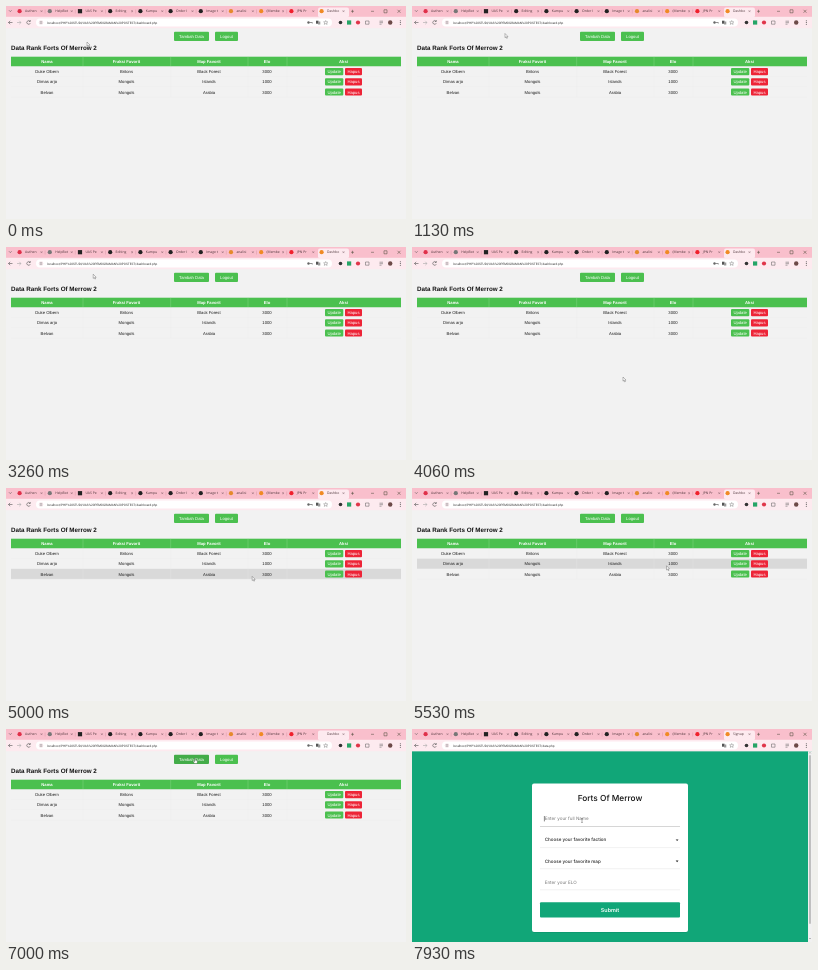
An HTML page for the animation above (8000 ms loop, 400 by 213 pixels).

```html
<!DOCTYPE html>
<html lang="id">
<head>
<meta charset="utf-8">
<title>Dashboard</title>
<style>
  html, body { margin: 0; width: 100%; height: 100%; overflow: hidden; background: #f2f2f2; }
  svg { display: block; width: 100vw; height: 100vh; text-rendering: geometricPrecision; }
  .page { font-family: "Liberation Sans", Arial, sans-serif; }
  .chrome { font-family: "Open Sans", sans-serif; }
  .form { font-family: Inter, sans-serif; }
</style>
</head>
<body>
<svg id="stage" viewBox="0 0 400 213" preserveAspectRatio="none"></svg>
<script>
const LOOP = 8000, STEP = 200 / 3, LOAD_AT = 6990, FORM_AT = 7130, FOCUS_AT = 7860;
const GREEN = '#4bc04f', GREEN_DARK = '#43ac49', RED = '#ed2437', INK = '#1c1c1c';
const TOP = 22.2, ROW_TOP = 60.5, ROW_HEIGHT = 10.2;
const TITLE = 'Forts Of Merrow';
const URL_BASE = 'localhost/PHP%20STUDI/UAS%20PEMOGRAMAN%20POSTEST/';

// time, x, y of the pointer tip
const PATH = [
  [0, 81, 36], [700, 90, 30], [1100, 93, 27.5], [1700, 93, 27.5],
  [2300, 87.2, 27.2], [3500, 87.2, 27.2], [3730, 104, 45], [3800, 176, 104],
  [4000, 211, 130], [4500, 211, 130], [5100, 249, 85], [5460, 254.5, 78],
  [5700, 254.5, 77], [6000, 240, 48], [6700, 189, 29.5], [7200, 189, 29.5],
  [7800, 170, 91.5], [8000, 170, 91.5]
];

const rect = (x, y, w, h, fill, more = '') =>
  `<rect x="${x}" y="${y}" width="${w}" height="${h}" fill="${fill}" ${more}/>`;
const dot = (x, y, r, fill, more = '') => `<circle cx="${x}" cy="${y}" r="${r}" fill="${fill}" ${more}/>`;
const line = (d, stroke = '#555', width = 0.6, more = '') =>
  `<path d="${d}" fill="none" stroke="${stroke}" stroke-width="${width}" ${more}/>`;
const text = (x, y, size, str, fill = INK, more = '') =>
  `<text x="${x}" y="${y}" font-size="${size}" fill="${fill}" ${more}>${str}</text>`;
const centred = (x, y, size, str, fill, more = '') =>
  text(x, y + size * 0.36, size, str, fill, `text-anchor="middle" ${more}`);
const button = (x, y, w, h, label, fill, id = '') =>
  rect(x, y, w, h, fill, `rx="1" id="${id}"`) + centred(x + w / 2, y + h / 2, 4.2, label, '#fff');

function browser() {
  const tabs = [
    ['Authen', '#e0304a'], ['HelpBot', '#777'], ['UAS Pe', '#222', true], ['Editing', '#222'],
    ['Kampu', '#222'], ['Order I', '#222'], ['Image t', '#222'], ['analisi', '#e58a2c'],
    ['(Membe', '#f08a24'], ['JPN Pr', '#f0202c'], ['Dashbo', '#f08a24']
  ];
  let out = rect(0, 0, 400, 11, '#f9bfcc') + rect(0, 10.8, 400, TOP - 10.8, '#fdeaef') +
    rect(312, 1.5, 31, 10, '#fdeaef', 'rx="2"') + line('M3 4.3l1.3 1.3l1.3-1.3');
  tabs.forEach(([name, color, square], i) => {
    const x = 13.6 + i * 30.2, active = i === 10;
    out += square ? rect(x - 2.1, 3.1, 4.2, 4.2, color) : dot(x, 5.2, 2.1, color, active ? 'id="favicon"' : '');
    out += text(x + 5.4, 6.4, 3.4, name, '#4b3338', active ? 'id="tab"' : '');
    out += line(`M${x + 21} 4.3l1.8 1.8m0-1.8l-1.8 1.8`, '#65464e', 0.4);
    if (i < 9) out += line(`M${x + 25.5} 3.5v4`, '#d58fa0', 0.4);
  });
  out += line('M345 5.3h3m-1.5-1.5v3M365 5.3h3M378 3.8h3v3h-3zM391.5 3.8l3 3m0-3l-3 3', '#443', 0.5);
  out += line('M6.5 16.5h-4m1.7-1.7l-1.7 1.7l1.7 1.7');
  out += line('M11 16.5h4m-1.7-1.7l1.7 1.7l-1.7 1.7', '#aaa');
  out += line('M24 15.3a1.8 1.8 0 1 0 .3 1.8M24.3 14v1.5h-1.5');
  out += rect(30, 12.5, 296, 8, '#fff', 'rx="4"') + dot(35, 16.5, 2.3, '#f4e6ea');
  out += line('M33.8 15.8h2.4M33.8 17.2h2.4', '#555', 0.4);
  out += text(41, 17.7, 3.12, '', '#333', 'id="url" font-family="Roboto, sans-serif"');
  out += `<g id="key">${dot(302.5, 16.5, 1.2, '#666')}${line('M303.5 16.5h2.8v1', '#666', 0.7)}</g>`;
  out += rect(310, 14.7, 2.5, 3, '#555') + rect(312, 15.5, 2.3, 3, '#999');
  out += line('M319.7 14.5l.6 1.4h1.5l-1.1 1l.4 1.5l-1.4-.8l-1.4.8l.4-1.5l-1.1-1h1.5z', '#666', 0.4);
  out += dot(334.5, 16.5, 1.8, '#333') + rect(341, 14.4, 4.2, 4.2, '#27a567') + dot(352, 16.5, 2.1, '#e0354a');
  out += line('M359.5 15h3.5v3.2h-3.5zM373.5 15.2h3.5m-3.5 1.5h3.5m-3.5 1.5h2', '#555', 0.5);
  out += dot(384.2, 16.5, 2.2, '#6d4a48');
  return out + [14.8, 16.5, 18.2].map(y => dot(394.3, y, 0.5, '#444')).join('');
}

function dashboard() {
  const centres = [41, 120.5, 203, 261, 337.5];
  const rows = [
    ['Duke Olbern', 'Britons', 'Black Forest', '3000'],
    ['Dimas arjo', 'Mongols', 'Islands', '1000'],
    ['Belvan', 'Mongols', 'Arabia', '3000']
  ];
  let out = rect(0, TOP, 400, 213 - TOP, '#f2f2f2');
  out += button(168, 25.7, 35, 9.3, 'Tambah Data', GREEN, 'add') + button(209, 25.7, 23, 9.3, 'Logout', GREEN);
  out += text(5, 43.5, 6.25, `Data Rank ${TITLE} 2`, '#111', 'font-weight="bold"');
  out += rect(5, 50.7, 390, 9.8, GREEN);
  ['Nama', 'Fraksi Favorit', 'Map Favorit', 'Elo', 'Aksi'].forEach((name, i) => {
    out += centred(centres[i], 55.5, 4.2, name, '#fff', 'font-weight="bold"');
  });
  rows.forEach((cells, i) => {
    const y = ROW_TOP + i * ROW_HEIGHT, mid = y + 5.1;
    out += rect(5, y, 390, ROW_HEIGHT, '#f2f2f2', 'class="row"');
    cells.forEach((cell, k) => { out += centred(centres[k], mid, 4.2, cell, INK); });
    out += button(319, mid - 3.6, 18.3, 7.2, 'Update', GREEN) + button(339, mid - 3.6, 17, 7.2, 'Hapus', RED);
    out += line(`M5 ${y + ROW_HEIGHT}h390`, '#e3e3e3', 0.3);
  });
  const columns = (y, h) => [77, 164.7, 242, 281].map(x => `M${x} ${y}v${h}`).join('');
  return out + line(columns(50.7, 9.8), '#a5dfa7', 0.3) + line(columns(ROW_TOP, 30.6), '#e6e6e6', 0.3);
}

function signup() {
  const fields = ['Enter your full Name', 'Choose your favorite faction', 'Choose your favorite map', 'Enter your ELO'];
  let out = rect(0, TOP, 400, 213 - TOP, '#11a678') + rect(396, TOP, 4, 213 - TOP, '#f1f1f1') +
    rect(397, 26, 2, 169, '#c0c0c0', 'rx="1"');
  out += line('M397.2 24.4l.8-1l.8 1M397.2 209l.8 1l.8-1', '#777', 0.5);
  out += rect(120, 54.8, 156, 148.8, '#0b9068', 'rx="2"') + rect(120, 54.5, 156, 148.5, '#fff', 'rx="2"');
  out += centred(198, 69.2, 8.3, TITLE, '#111', 'font-weight="500"');
  fields.forEach((label, i) => {
    const y = 89.7 + i * 21.1, select = i === 1 || i === 2;
    out += text(132.7, y + 1.6, 4.55, label, select ? '#222' : '#777', select ? 'font-weight="500"' : '');
    out += line(`M128 ${y + 7.8}h140`, '#ddd', 0.4, i ? '' : 'id="underline"');
    if (select) out += `<path d="M263.7 ${y - 0.3}h2.8l-1.4 1.6z" fill="#222"/>`;
  });
  out += line('M132.4 87v5.4', '#111', 0.5, 'id="caret"');
  return out + rect(128, 173.2, 140, 15.2, '#11a678', 'rx="1"') +
    centred(198, 180.9, 5.4, 'Submit', '#fff', 'font-weight="600"');
}

const cursors = {
  arrow: '<path d="M0 0v4.2l1-.9l.7 1.6l.7-.3l-.7-1.5h1.3z" fill="#fff" stroke="#444" stroke-width=".35"/>',
  hand: '<path d="M-.4 0h.8v1.8l1.9.4v1.8l-.6 1h-2.2l-1.4-1.9l.5-.5l1 .6z" fill="#fff" stroke="#444" stroke-width=".35"/>',
  beam: line('M-.7-2h1.4M0-2v4M-.7 2h1.4', '#444', 0.45)
};

const stage = document.getElementById('stage');
stage.innerHTML = `<g id="dash" class="page">${dashboard()}</g><g id="form" class="form">${signup()}</g>
  <g class="chrome">${browser()}</g><g id="pointer">` +
  Object.entries(cursors).map(([name, art]) => `<g id="${name}">${art}</g>`).join('') + '</g>';

const get = id => document.getElementById(id);
const show = (id, on) => get(id).setAttribute('display', on ? 'inline' : 'none');
const tableRows = [...document.querySelectorAll('.row')];

function pointerAt(t) {
  const i = Math.max(1, PATH.findIndex(p => p[0] > t));
  const [t0, x0, y0] = PATH[i - 1], [t1, x1, y1] = PATH[i];
  const u = (t - t0) / (t1 - t0), k = u * u * (3 - 2 * u);
  return [x0 + (x1 - x0) * k, y0 + (y1 - y0) * k];
}

function render(time) {
  const t = Math.floor((time + 5) / STEP) * STEP % LOOP;
  const [x, y] = pointerAt(t);
  const inForm = t >= FORM_AT, focused = t >= FOCUS_AT;
  const onAdd = !inForm && x > 168 && x < 203 && y > 25.7 && y < 35;
  const onField = inForm && x > 128 && x < 268 && y > 84 && y < 98;
  const hovered = Math.floor((y - ROW_TOP) / ROW_HEIGHT);

  show('dash', !inForm);
  show('form', inForm);
  show('key', !inForm);
  show('favicon', t < LOAD_AT || inForm);
  get('url').textContent = URL_BASE + (inForm ? 'data.php' : 'dashboard.php');
  get('tab').textContent = inForm ? 'Signup' : 'Dashbo';
  get('add').setAttribute('fill', onAdd ? GREEN_DARK : GREEN);
  tableRows.forEach((row, i) => row.setAttribute('fill', i === hovered ? '#d9d9d9' : '#f2f2f2'));
  show('caret', focused);
  get('underline').setAttribute('stroke', focused ? '#999' : '#ddd');
  get('pointer').setAttribute('transform', `translate(${x} ${y})`);
  show('arrow', !onAdd && !onField);
  show('hand', onAdd);
  show('beam', onField);
}

const start = performance.now();
function tick() {
  render((performance.now() - start) % LOOP);
  requestAnimationFrame(tick);
}
tick();
</script>
</body>
</html>
```
